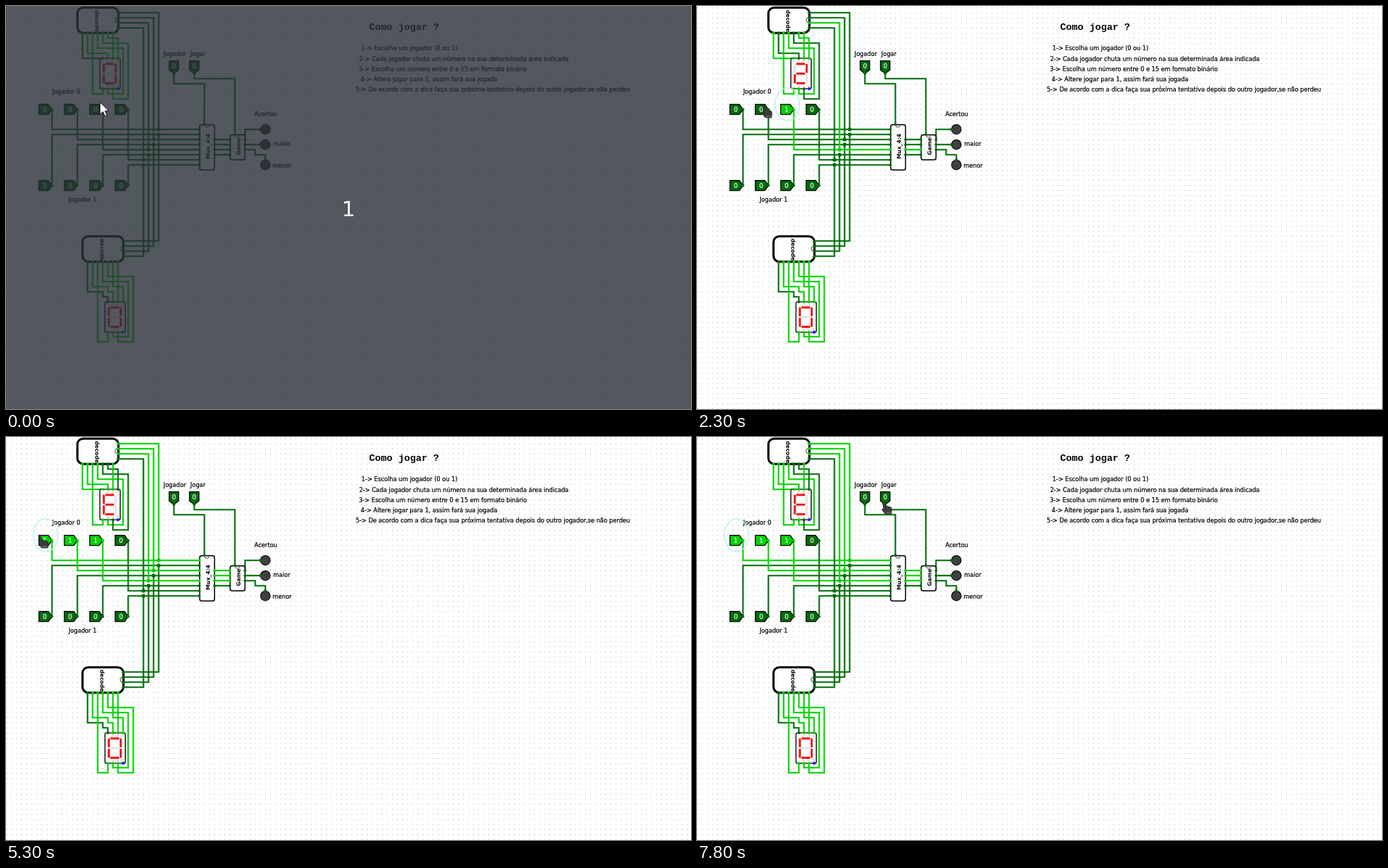
These frames come from a looping animation (944 by 556 pixels, 8 s). An HTML page:

```html
<!DOCTYPE html>
<html lang="pt">
<head>
<meta charset="utf-8">
<style>
html, body { margin: 0; width: 100%; height: 100%; overflow: hidden; background: #fff; }
svg { display: block; width: 944px; height: 556px; }
text { font: 8.15px "DejaVu Sans", sans-serif; text-anchor: middle; }
.label { stroke: #000; stroke-width: .22px; }
.chip { font-weight: bold; font-size: 7.5px; dominant-baseline: central; }
.value { font-size: 8.6px; fill: #fff; stroke: #fff; stroke-width: .2px; }
.title { font: bold 13.4px "Liberation Mono", monospace; }
.count { font-size: 29px; fill: #fff; }
</style>
</head>
<body>
<svg id="stage" viewBox="0 0 944 556"></svg>
<script>
const LOOP = 8000;
const ON = '#00d200', OFF = '#006e0a';
const color = on => on ? ON : OFF;
const BIT_X = [63, 98, 133, 168];

const LABELS = [
  ['Jogador', 232.5, 69], ['Jogar', 264.5, 69], ['Jogador 0', 83, 121], ['Jogador 1', 105.5, 270],
  ['Acertou', 358, 152], ['maior', 380, 193], ['menor', 380.5, 223],
  ['1-> Escolha um jogador (0 ou 1)', 556, 61],
  ['2-> Cada jogador chuta um número na sua determinada área indicada', 631, 76],
  ['3-> Escolha um número entre 0 e 15 em formato binário', 602, 90],
  ['4-> Altere jogar para 1, assim fará sua jogada', 583, 104],
  ['5-> De acordo com a dica faça sua próxima tentativa depois do outro jogador,se não perdeu', 671, 118]
];

// Lit segments for each value shown
const DIGITS = { 0: 'abcdef', 2: 'abdeg', 6: 'acdefg', 14: 'adefg' };

// Decoder outputs, left to right: g f e d c b a
const TOP_WIRES = {
  g: 'M105 37V72H133', f: 'M112 37V65H140V72', e: 'M119 37V121H133V114',
  d: 'M126 37V58H161V121H140V114', c: 'M133 37V51H168V128H147V114',
  b: 'M140 37V44H154V72', a: 'M147 37V72'
};
const BOTTOM_WIRES = {
  g: 'M112 352V394H133V401H140V408', f: 'M119 352V387H140V394H147V408', e: 'M126 352V463H140V450',
  d: 'M133 352V380H168V456H147V450', c: 'M140 352V373H175V463H154V450',
  b: 'M147 352V387H161V408', a: 'M154 352V408'
};

const SEGMENTS = {
  a: [7.5, 6.3, 12, 2.8], g: [7.5, 19.7, 12, 2.8], d: [7.5, 33, 12, 2.8],
  f: [4, 7.6, 2.8, 12.4], b: [20.3, 7.6, 2.8, 12.4],
  e: [4, 22, 2.8, 12.4], c: [20.3, 22, 2.8, 12.4]
};
// Display pins relative to the body
const PINS = { g: [4, 0], f: [11, 0], a: [18, 0], b: [25, 0], e: [4, 42], d: [11, 42], c: [18, 42] };

// time, x, y of the pointing finger
const CURSOR = [
  [100, 122, 137], [2100, 118, 138], [2200, 106, 138], [2300, 92, 138], [2400, 83, 138],
  [3800, 80, 138], [4000, 68, 136], [4300, 54, 136], [4400, 48, 136], [4700, 46, 137], [4800, 47, 137],
  [6200, 110, 125], [6300, 240, 100], [6400, 309, 85],
  [6600, 304, 88], [6700, 290, 94], [6800, 272, 99], [6900, 254, 102], [7000, 240, 101],
  [7100, 231, 98], [7200, 230, 95], [7300, 237, 92], [7400, 245, 90],
  [7500, 249, 89], [7600, 252, 88], [7700, 255, 89], [7800, 257, 90]
];
const VALUES = [[0, 0], [1200, 2], [3000, 6], [5300, 14]];
const RINGS = [[0, null], [900, 124.5], [2900, 89.5], [5100, 54.5]];
const latest = (keys, t) => keys.filter(k => k[0] <= t).pop();

const wire = (d, on) => `<path d="${d}" fill="none" stroke="${color(on)}" stroke-width="2.1"/>`;
const dot = (x, y, on, r = 1.9) => `<circle cx="${x}" cy="${y}" r="${r}" fill="${color(on)}"/>`;
const text = (s, x, y, cls, extra = '') => `<text class="${cls}" x="${x}" y="${y}" ${extra}>${s}</text>`;
const box = (x, y, w, h, r, line) =>
  `<rect x="${x}" y="${y}" width="${w}" height="${h}" rx="${r}" fill="#fff" stroke="#000" stroke-width="${line}"/>`;
const notch = d => `<path d="${d}" fill="none" stroke="#777" stroke-width="1.2"/>`;
const turned = (s, x, y, angle) => text(s, x, y, 'chip', `transform="rotate(${angle} ${x} ${y})"`);

function inputPin(x, y, on) {
  return `<path d="M${x - 18} ${y - 7}h13l5 7-5 7h-13z" fill="${color(on)}" stroke="#000" stroke-width="1.3"/>`
    + dot(x, y, on) + text(+on, x - 10, y + 3.2, 'value');
}

function downPin(x) {
  return `<path d="M${x - 6.5} 75.5h13v12.5l-6.5 5-6.5-5z" fill="${OFF}" stroke="#000" stroke-width="1.3"/>`
    + dot(x, 93, false) + text(0, x, 86, 'value');
}

function decoder(x, y, value, lit) {
  let s = box(x, y, 56.5, 35, 8, 3) + notch(`M${x + 55} ${y + 14}a3 3 0 0 0 0 6`)
    + turned('decode', x + 27, y + 18.5, 90);
  for (let i = 0; i < 4; i++) s += dot(x + 56, y + 7 + 7 * i, value >> (3 - i) & 1);
  [...'gfedcba'].forEach((seg, i) => s += dot(x + 7 + 7 * i, y + 35, lit.includes(seg)));
  return s;
}

function display(x, y, lit) {
  let s = box(x, y, 28, 42, 2, 1.3);
  for (const px of [11, 18, 25])
    s += `<path d="M${x + px} ${y + 2}v3h-3M${x + px - 3} ${y + 37}h3v3" fill="none" stroke="#f99" stroke-width=".7"/>`;
  for (const seg in SEGMENTS) {
    const [sx, sy, w, h] = SEGMENTS[seg];
    s += `<rect x="${x + sx}" y="${y + sy}" width="${w}" height="${h}" fill="${lit.includes(seg) ? '#f00d0d' : '#e2e2e2'}"/>`;
  }
  for (const seg in PINS) s += dot(x + PINS[seg][0], y + PINS[seg][1], lit.includes(seg));
  return s + `<circle cx="${x + 25}" cy="${y + 42}" r="2.1" fill="#22f"/>`;
}

function player(value, pinY, firstY, decoderY, decoderX) {
  let wires = '', pins = '';
  BIT_X.forEach((x, i) => {
    const on = value >> (3 - i) & 1, y = firstY + 14 * i, busX = 210 - 7 * i;
    wires += wire(`M${x} ${pinY}V${y}H266`, on)
      + wire(`M${busX} ${y}V${decoderY + 7 * i}H${decoderX}`, on);
    pins += dot(busX, y, on, 2.6) + dot(266, y, on) + inputPin(x, pinY, on);
  });
  return { wires, pins };
}

function scene(value) {
  const lit = DIGITS[value], zero = DIGITS[0];
  const p0 = player(value, 142.5, 170, 9, 154), p1 = player(0, 247.5, 177, 324, 161);
  let s = p1.wires + p0.wires;
  for (const seg of 'gfedcba')
    s += wire(TOP_WIRES[seg], lit.includes(seg)) + wire(BOTTOM_WIRES[seg], zero.includes(seg));
  s += wire('M231 93V107H273V163') + wire('M259 93V100H315V177')
    + wire('M329 184V170H350') + wire('M329 191H350') + wire('M329 198H343V205H357V212');
  for (let i = 0; i < 4; i++) s += wire(`M287 ${184 + 7 * i}H308`, value >> (3 - i) & 1);

  s += box(266.5, 163.5, 20.5, 62.5, 3, 1.5) + notch('M273.5 164a3 3 0 0 0 6 0') + turned('Mux_4:4', 278, 193.5, -90)
    + box(308.5, 177.5, 20.5, 34.5, 3, 1.5) + notch('M315.5 178a3 3 0 0 0 6 0') + turned('Game', 320, 193.5, -90)
    + decoder(98, 2, value, lit) + decoder(105, 317.5, 0, zero)
    + display(129, 72, lit) + display(136, 408, zero) + p0.pins + p1.pins;
  for (let i = 0; i < 4; i++) {
    const y = 184 + 7 * i, on = value >> (3 - i) & 1;
    s += dot(287, y, on) + dot(308, y, on);
  }
  for (const [x, y] of [[357, 170], [357, 191], [357, 219]])
    s += `<circle cx="${x}" cy="${y}" r="6.6" fill="#404040" stroke="#111" stroke-width="1.3"/>`;
  for (const [x, y] of [[273, 163], [315, 177], [329, 184], [329, 191], [329, 198], [350, 170], [350, 191], [357, 212]])
    s += dot(x, y, false);
  return s + downPin(231) + downPin(259);
}

const GRID = `<defs><pattern id="grid" width="7" height="7" patternUnits="userSpaceOnUse">
  <rect y="2" width="1" height="1" fill="#b8b8b8"/></pattern></defs>
  <rect width="944" height="556" fill="#fff"/><rect width="944" height="556" fill="url(#grid)"/>`;
const WORDS = text('Como jogar ?', 548.7, 33, 'title') + LABELS.map(([s, x, y]) => text(s, x, y, 'label')).join('');
const COUNTDOWN = '<rect width="944" height="556" fill="#292e36" opacity=".8"/>' + text(1, 472, 289.5, 'count')
  + '<path d="M129.5 132.5v17l4-3.6 2.8 6 2.9-1.3-2.7-5.8h5.3z" fill="#fff" stroke="#111" stroke-width="1"/>';

function hand(x, y) {
  return `<path transform="translate(${x} ${y})" d="M-1.4 .6Q0-1 1.2.6L2.8 5 9.5 6.6Q11.4 7.4 11.2 10L10.8 16H2.2L-2 10.6Q-2.4 8.6 .3 9.2Z"
    fill="#3c3c3c" stroke="#222" stroke-width=".8"/>
    <path transform="translate(${x} ${y})" d="M3.2 14.2H10" stroke="#999" stroke-width=".8"/>`;
}

const stage = document.getElementById('stage');
let shown = -1;

function draw() {
  const t = Math.floor(performance.now() % LOOP / 100) * 100;
  if (t !== shown) {
    shown = t;
    const ringX = latest(RINGS, t)[1];
    let s = GRID + `<g transform="translate(.4 .2)">${scene(latest(VALUES, t)[1])}</g>` + WORDS;
    if (ringX) s += `<ellipse cx="${ringX}" cy="135.5" rx="16.8" ry="22.8" fill="none" stroke="#b4eef2" stroke-width="1.3"/>`;
    s += t < 100 ? COUNTDOWN : hand(...latest(CURSOR, t).slice(1));
    stage.innerHTML = s;
  }
  requestAnimationFrame(draw);
}
draw();
</script>
</body>
</html>
```
